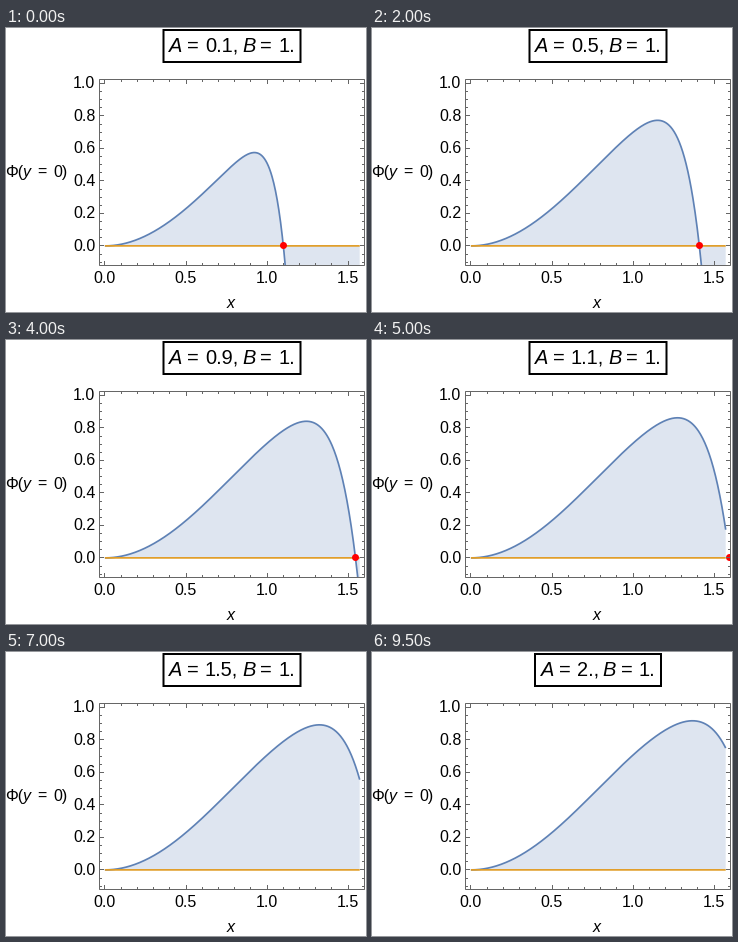
Recreate the animation shown at these times as a matplotlib script. Size 360x284 px, loop 10000 ms.

```python
import numpy as np
import matplotlib.pyplot as plt
from matplotlib.animation import FuncAnimation
from matplotlib.patches import Circle, Rectangle

W, H, DPI = 360, 284, 100
PX = 72 / DPI  # points per pixel
LEFT, RIGHT, TOP, BOTTOM = 93.8, 358.8, 51.9, 237.7
X_MAX = np.pi / 2
X_PAD = 0.02 * X_MAX
Y_LOW, Y_HIGH = -0.122, 1.022
BLUE, ORANGE = (0.368, 0.507, 0.71), (0.881, 0.611, 0.142)
GREY = "0.4"

plt.rcParams["font.family"] = "Liberation Sans"
fig = plt.figure(figsize=(W / DPI, H / DPI), dpi=DPI, facecolor="white")
ax = fig.add_axes([0, 0, 1, 1])
ax.set_xlim(0, W)
ax.set_ylim(H, 0)
ax.axis("off")


def sx(x):
    return LEFT + (x + X_PAD) / (X_MAX + 2 * X_PAD) * (RIGHT - LEFT)


def sy(y):
    return BOTTOM - (y - Y_LOW) / (Y_HIGH - Y_LOW) * (BOTTOM - TOP)


def pixel_centre(v):
    return np.floor(v) + 0.5


def potential(x, a):
    return np.sin(x) ** 2 - (1 - np.cos(x)) ** 8 / a ** 2


def find_root(a):
    low, high = 0.5, 2.5
    for _ in range(50):
        mid = (low + high) / 2
        if potential(mid, a) > 0:
            low = mid
        else:
            high = mid
    return low


def label(x, y, text, size=16, italic=False, ha="left"):
    return ax.text(x, y, text, fontsize=size * PX, ha=ha, va="baseline",
                   style="italic" if italic else "normal", color="black")


def segment(xs, ys, color, width, zorder):
    return ax.plot(xs, ys, color=color, lw=width * PX, zorder=zorder,
                   solid_capstyle="butt", snap=False)[0]


def tick(x, y, dx, dy):
    x, y = pixel_centre(x), pixel_centre(y)
    segment([x, x + dx], [y, y + dy], GREY, 1, 5)


def draw_ticks():
    for i in range(16):
        x, size = sx(i / 10), 4.5 if i % 5 == 0 else 2.5
        tick(x, BOTTOM, 0, -size)
        tick(x, TOP, 0, size)
        if i % 5 == 0:
            label(x - 0.5, 255, f"{i / 10:.1f}", ha="center")
    for i in range(-2, 21):
        y, size = sy(i / 20), 4.5 if i % 4 == 0 else 2.5
        tick(LEFT, y, size, 0)
        tick(RIGHT, y, -size, 0)
        if i % 4 == 0:
            label(89.5, y + 5, f"{i / 20:.1f}", ha="right")


corner = pixel_centre(LEFT), pixel_centre(TOP)
size = pixel_centre(RIGHT) - corner[0], pixel_centre(BOTTOM) - corner[1]
clip = Rectangle(corner, *size, transform=ax.transData)
ax.add_patch(Rectangle(corner, *size, fill=False, ec=GREY, lw=PX, zorder=5,
                       snap=False))
draw_ticks()

label(-1, 149, "Φ(")
label(17, 149, "y", italic=True)
label(31, 149, "=")
label(47, 149, "0)")
label(225, 280, "x", italic=True, ha="center")

xs = np.linspace(0, X_MAX, 600)
area = ax.fill(sx(xs), sy(xs), color=BLUE, alpha=0.2, lw=0, zorder=1)[0]
curve = segment([], [], BLUE, 1.7, 2)
segment([sx(0), sx(X_MAX)], [sy(0), sy(0)], ORANGE, 1.7, 3)
dot = ax.add_patch(Circle((0, pixel_centre(sy(0))), 3.5, color="red", lw=0,
                          zorder=4))
for artist in (area, curve, dot):
    artist.set_clip_path(clip)

frame_box = ax.add_patch(Rectangle((157.5, 2), 137, 32, fill=False,
                                   ec="black", lw=2 * PX, joinstyle="miter",
                                   snap=False))
title = [label(0, 24, text, 20, italic) for text, italic in
         (("A", True), ("=", False), ("", False),
          ("B", True), ("=", False), ("1.", False))]
offsets = (5.5, 23.5, 41.5, 78.5, 96.5, 114.5)


def update(frame):
    a = (frame + 1) / 10
    whole = (frame + 1) % 10 == 0
    ys = potential(xs, a)
    curve.set_data(sx(xs), sy(ys))
    area.set_xy(np.column_stack([np.r_[sx(xs), sx(X_MAX), sx(0)],
                                 np.r_[sy(ys), sy(0), sy(0)]]))
    dot.center = pixel_centre(sx(find_root(a))), pixel_centre(sy(0))

    shift = 11 if whole else 0
    box_left = 157.5 + shift / 2
    frame_box.set_x(box_left)
    frame_box.set_width(137 - shift)
    title[2].set_text(f"{a:.0f}.," if whole else f"{a:.1f},")
    for i, (part, offset) in enumerate(zip(title, offsets)):
        part.set_x(box_left + offset - (shift if i > 2 else 0))
    return [area, curve, dot, frame_box, *title]


anim = FuncAnimation(fig, update, frames=20, interval=500, repeat=True,
                     repeat_delay=0, blit=False)
plt.show()
```
